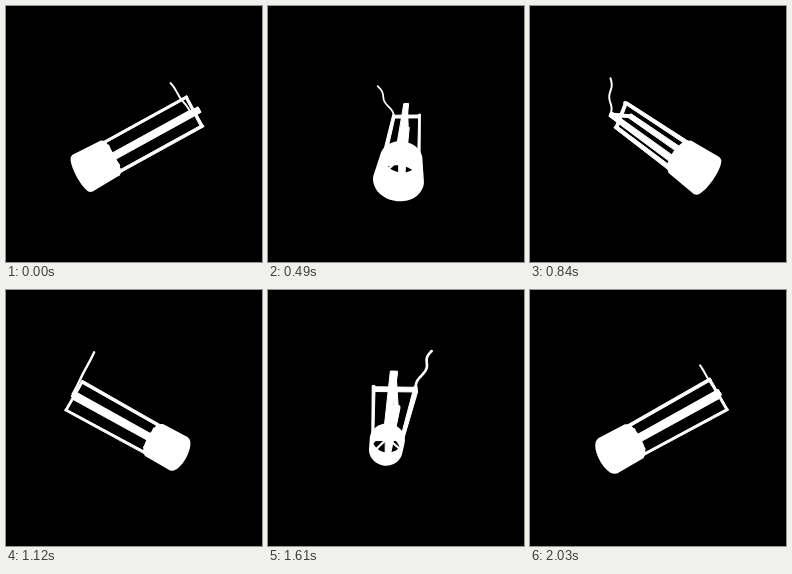
An HTML page with a canvas that plays this animation: 256x256 px, repeating every 2.1 s.

```html
<!DOCTYPE html>
<html lang="en">
<head>
<meta charset="utf-8">
<title>Spinning part</title>
<style>
html, body { margin: 0; width: 100%; height: 100%; overflow: hidden; background: #000; }
canvas { display: block; width: 100vw; height: 100vh; }
</style>
</head>
<body>
<canvas id="stage" width="256" height="256"></canvas>
<script>
const ctx = document.getElementById("stage").getContext("2d");
const STEP = 70, STEPS = 30, CAMERA = 240, MID = 128;
const TIP = [59, 22, 7], TILT = 0.503;
const NEAR = 91, FAR = 125.3, ARM = 16;
const sinT = Math.sin(TILT), cosT = Math.cos(TILT);
let sinA = 0, cosA = 1;

// Turn about the vertical axis, then apply perspective.
function project([x, y, z]) {
  const depth = z * cosA - x * sinA;
  const k = CAMERA / (CAMERA - depth);
  return [MID + (x * cosA + z * sinA) * k, MID - y * k, k];
}

// t runs from the tip down the shaft; u and w run across it.
function body(t, u, w) {
  return project([
    TIP[0] - t * cosT - u * sinT,
    TIP[1] - t * sinT + u * cosT,
    TIP[2] + w
  ]);
}

function hull(points) {
  const sorted = [...points].sort((a, b) => a[0] - b[0] || a[1] - b[1]);
  const half = list => {
    const out = [];
    for (const p of list) {
      while (out.length > 1) {
        const [a, b] = out.slice(-2);
        const turn = (b[0] - a[0]) * (p[1] - a[1]) - (b[1] - a[1]) * (p[0] - a[0]);
        if (turn > 0) break;
        out.pop();
      }
      out.push(p);
    }
    return out.slice(0, -1);
  };
  return half(sorted).concat(half(sorted.reverse()));
}

function trace(points) {
  ctx.beginPath();
  points.forEach(p => ctx.lineTo(p[0], p[1]));
}

function fill(points, color = "#fff") {
  trace(points);
  ctx.closePath();
  ctx.fillStyle = color;
  ctx.fill();
}

function line(points, width) {
  trace(points);
  ctx.lineWidth = width;
  ctx.stroke();
}

function circle(t, r) {
  return Array.from({ length: 64 }, (_, i) => {
    const a = i * Math.PI / 32;
    return body(t, r * Math.cos(a), r * Math.sin(a));
  });
}

// A bar with softened edges.
function box(t, u, w, dt, du, dw) {
  const corners = [];
  for (const i of [-1, 1])
    for (const j of [-1, 1])
      for (const k of [-1, 1])
        corners.push(body(t + i * dt, u + j * du, w + k * dw));
  fill(hull(corners));
  ctx.closePath();
  ctx.lineWidth = 1;
  ctx.stroke();
}

function drawHead() {
  fill(hull([
    ...circle(NEAR, 17.5), ...circle(NEAR + 2.5, 19.2),
    ...circle(FAR - 1.5, 20.2), ...circle(FAR, 19.6)
  ]));

  // The tube is open wherever both ends line up.
  ctx.save();
  trace(circle(NEAR, 16.4));
  ctx.clip();
  fill(circle(FAR, 17), "#000");
  ctx.restore();

  box(NEAR, 0, 0, 0.3, 16.5, 2.6);
  box(NEAR, 0, 0, 0.3, 2.6, 16.5);
  for (const s of [-1, 1])
    line([body(NEAR, -11.5, -11.5 * s), body(NEAR, 11.5, 11.5 * s)], 2.2);
}

function drawStraps() {
  const mid = NEAR / 2;
  for (const s of [-1, 1]) {
    box(mid, ARM * s, 0, mid, 1, 2.8);
    box(mid, 0, ARM * s, mid, 2.8, 1);
  }
  box(0.8, 0, 0, 0.8, ARM + 0.5, 1.6);
  box(0.8, 0, 0, 0.8, 1.6, ARM + 0.5);
}

function drawWire() {
  const from = [40.5, 56.5, -26], to = [59, 22, -9];
  const points = Array.from({ length: 33 }, (_, i) => {
    const s = i / 32;
    const p = from.map((v, n) => v + (to[n] - v) * s);
    p[2] += 1.7 * Math.sin(s * Math.PI * 3);
    return project(p);
  });
  line(points, 2.1 * points[16][2]);
}

function draw(now) {
  const step = Math.floor(now / STEP) % STEPS;
  const angle = step / STEPS * Math.PI * 2;
  sinA = Math.sin(angle);
  cosA = Math.cos(angle);
  ctx.fillStyle = "#000";
  ctx.fillRect(0, 0, 256, 256);
  ctx.strokeStyle = "#fff";
  ctx.lineCap = ctx.lineJoin = "round";
  drawHead();
  drawStraps();
  drawWire();
}

let start;
function tick(now) {
  start ??= now;
  draw(now - start);
  requestAnimationFrame(tick);
}
draw(0);
requestAnimationFrame(tick);
</script>
</body>
</html>
```
